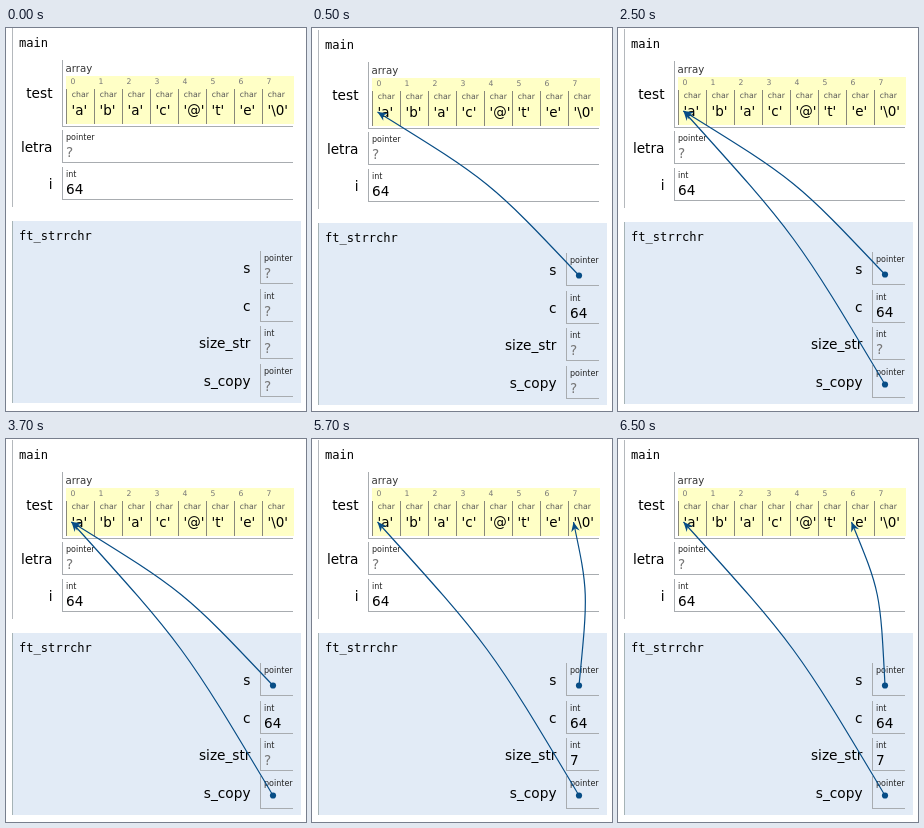
These frames come from a looping animation (300 by 383 pixels, 8 s). An HTML page with a canvas:

```html
<!DOCTYPE html>
<html>
<head>
<meta charset="utf-8">
<title>Pointer trace</title>
<style>
html, body { margin: 0; height: 100%; overflow: hidden; background: #fff; }
canvas { display: block; }
</style>
</head>
<body>
<canvas id="stage" width="300" height="383"></canvas>
<script>
const ctx = document.getElementById('stage').getContext('2d');
const SANS = '"DejaVu Sans", sans-serif';
const MONO = '"DejaVu Sans Mono", monospace';
const BLUE = '#074d86';
const LINE = '#a8acb0';
const LOOP = 8000;

const chars = ["'a'", "'b'", "'a'", "'c'", "'@'", "'t'", "'e'", "'\\0'"];
const cellX = i => 60 + 28 * i;

// s and copy hold the index of the array cell they point at
const steps = [
  { at: 0, dy: 0, s: '?', c: '?', size: '?', copy: '?' },
  { at: 500, dy: 2, s: 0, c: '64', size: '?', copy: '?' },
  { at: 2500, dy: 1, s: 0, c: '64', size: '?', copy: 0 },
  { at: 4500, dy: 1, s: 7, c: '64', size: '7', copy: 0 },
  { at: 6500, dy: 1, s: 6, c: '64', size: '7', copy: 0 }
];

function text(str, x, y, size, color = '#000', align = 'left', family = SANS) {
  ctx.font = `${size}px ${family}`;
  ctx.fillStyle = color;
  ctx.textAlign = align;
  ctx.fillText(str, x, y);
}

function rect(x, y, w, h, color) {
  ctx.fillStyle = color;
  ctx.fillRect(x, y, w, h);
}

// left and bottom border of a value box
function corner(x, top, right, bottom) {
  rect(x, top, 1, bottom - top, LINE);
  rect(x, bottom - 1, right - x, 1, LINE);
}

function label(name, x, y) {
  text(name, x - 9.5, y, 13.7, '#000', 'right');
}

function row(name, type, value, x, top) {
  label(name, x, top + 21.5);
  corner(x, top, 287, top + 33);
  text(type, x + 4, top + 10, 8, '#222');
  if (typeof value === 'string') {
    text(value, x + 4, top + 27, 13.6, value === '?' ? '#777' : '#000');
  }
}

function array() {
  label('test', 56, 70);
  text('array', 59.5, 44, 10.2, '#333');
  corner(56, 32, 287, 99);
  rect(60, 48, 228, 48, '#ffffc6');
  chars.forEach((ch, i) => {
    const x = cellX(i);
    text(i, x + 4.5, 55.5, 7.7, '#777');
    text('char', x + 5.7, 69, 7.8, '#555');
    text(ch, x + 5.5, 87, 13.5);
    rect(x, 61, 1, 35, '#88887a');
  });
}

function arrow(index, y) {
  const x = 267, tx = cellX(index) + 5.5, ty = 82;
  const cx = (x + tx) / 2 + 12, cy = (y + ty) / 2 - 12;
  ctx.strokeStyle = ctx.fillStyle = BLUE;
  ctx.lineWidth = 1.2;
  ctx.beginPath();
  ctx.moveTo(x, y);
  ctx.bezierCurveTo(cx, cy, cx, cy, tx, ty);
  ctx.stroke();
  ctx.beginPath();
  ctx.arc(x, y, 3.1, 0, 7);
  ctx.fill();
  ctx.save();
  ctx.translate(tx, ty);
  ctx.rotate(Math.atan2(ty - cy, tx - cx));
  ctx.beginPath();
  ctx.moveTo(0, 0);
  ctx.lineTo(-9.5, -4.3);
  ctx.lineTo(-6.5, 0);
  ctx.lineTo(-9.5, 4.3);
  ctx.fill();
  ctx.restore();
}

function draw(step) {
  ctx.setTransform(1, 0, 0, 1, 0, 0);
  rect(0, 0, 300, 383, '#fff');
  ctx.translate(0, step.dy);

  rect(6, 0, 1, 179, '#b4b8bc');
  text('main', 13, 18.5, 12.1, '#000', 'left', MONO);
  array();
  row('letra', 'pointer', '?', 56, 102);
  row('i', 'int', '64', 56, 139);

  rect(6, 193, 289, 182, '#e2ebf6');
  rect(6, 193, 1, 182, '#a6b3b6');
  text('ft_strrchr', 13, 211.5, 12.1, '#000', 'left', MONO);
  row('s', 'pointer', step.s, 254, 223);
  row('c', 'int', step.c, 254, 261);
  row('size_str', 'int', step.size, 254, 298);
  row('s_copy', 'pointer', step.copy, 254, 336);

  if (step.s !== '?') arrow(step.s, 245.5);
  if (step.copy !== '?') arrow(step.copy, 355.5);
}

const start = performance.now();
function tick() {
  const t = (performance.now() - start) % LOOP;
  draw(steps.filter(step => step.at <= t).pop());
  requestAnimationFrame(tick);
}
tick();
</script>
</body>
</html>
```
